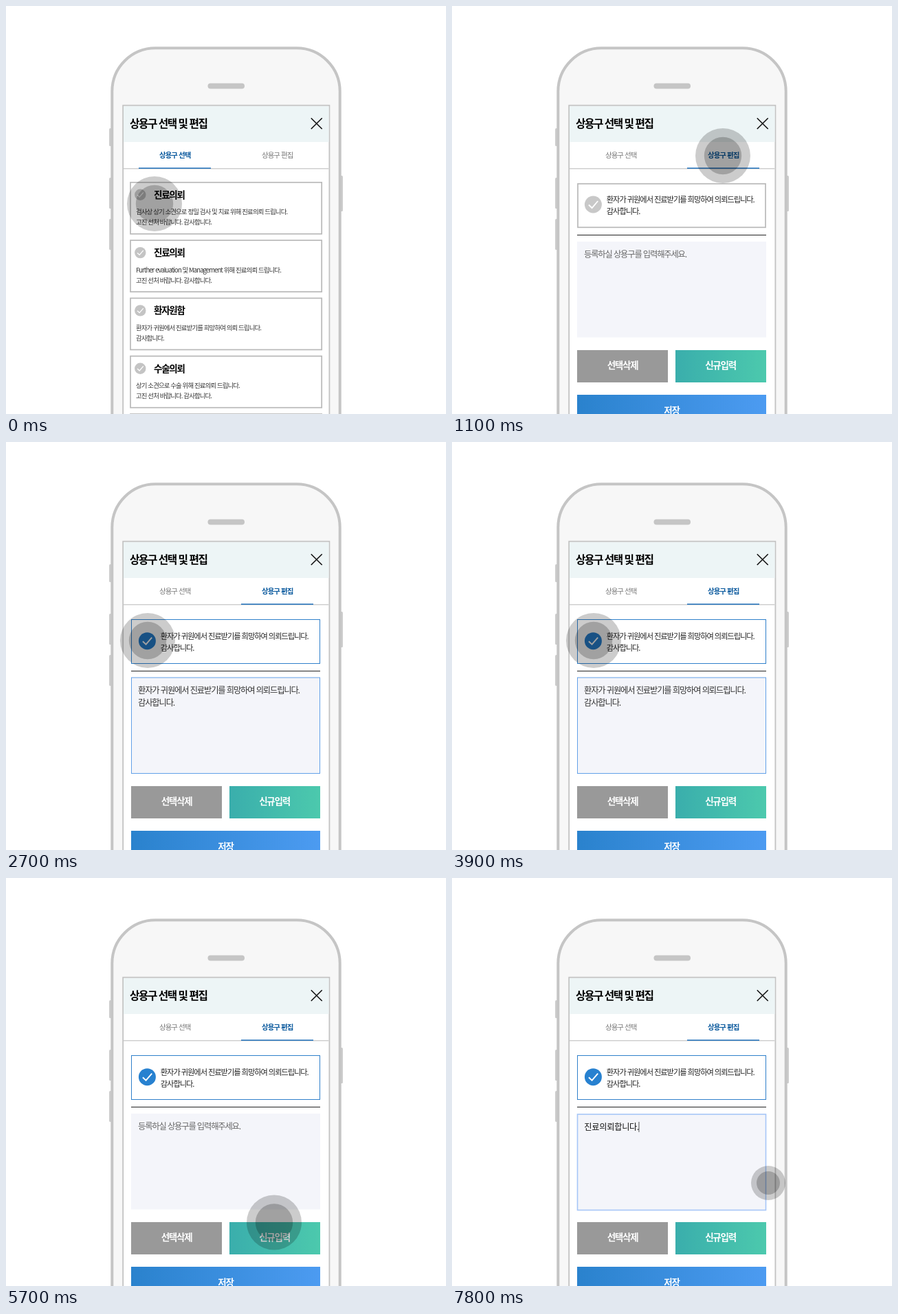
Animation, 640 px wide and 594 px high, one loop 8000 ms. Source, as an HTML page:

```html
<!DOCTYPE html>
<html lang="ko">
<head>
<meta charset="utf-8">
<title>상용구 선택 및 편집</title>
<style>
html, body { margin: 0; width: 100%; height: 100%; overflow: hidden; background: #fff; }
svg { display: block; width: 640px; height: 594px; }
text { font-family: "Noto Sans CJK KR", "Noto Sans CJK", "Noto Sans CJK JP", sans-serif; letter-spacing: -.094em; white-space: pre; }
</style>
</head>
<body>
<svg id="stage" viewBox="0 0 640 594" xmlns="http://www.w3.org/2000/svg">
  <defs>
    <linearGradient id="teal"><stop stop-color="#3aaeac"/><stop offset="1" stop-color="#4cc9ad"/></linearGradient>
    <linearGradient id="blue"><stop stop-color="#2a82cd"/><stop offset="1" stop-color="#4c9bf1"/></linearGradient>
  </defs>
</svg>
<script>
const LOOP = 8000;
const stage = document.getElementById('stage');

function add(parent, tag, attrs) {
  const el = document.createElementNS('http://www.w3.org/2000/svg', tag);
  set(el, attrs);
  return parent.appendChild(el);
}
function set(el, attrs) {
  for (const k in attrs) el.setAttribute(k, attrs[k]);
}
const group = parent => add(parent, 'g', {});
const rect = (p, x, y, width, height, fill, more = {}) =>
  add(p, 'rect', { x, y, width, height, fill, ...more });
const line = (p, x1, y1, x2, y2, stroke, w = 1) =>
  add(p, 'line', { x1, y1, x2, y2, stroke, 'stroke-width': w });

// Places text by the vertical middle of its Hangul glyphs.
function label(p, str, x, mid, size, fill, more = {}) {
  const el = add(p, 'text', { x, y: mid + size * .37, 'font-size': size, fill, ...more });
  el.textContent = str;
  return el;
}
const bold = { 'font-weight': 700 };
const centered = { 'font-weight': 700, 'text-anchor': 'middle' };

function check(p, cx, cy, r, fill) {
  const g = add(p, 'g', { transform: `translate(${cx} ${cy}) scale(${r / 12.5})` });
  const disc = add(g, 'circle', { r: 12.5, fill });
  add(g, 'path', { d: 'M-6.5 .5L-1.8 5L6.8 -5', fill: 'none', stroke: '#fff', 'stroke-width': 1.9 });
  return disc;
}
function show(el, on) {
  el.setAttribute('display', on ? 'inline' : 'none');
}

// Phone
const phone = group(stage);
for (const [x, y, h] of [[150, 178, 26], [150, 250, 45], [150, 310, 45], [485, 247, 52]])
  rect(phone, x, y, 5, h, '#cdcdcd', { rx: 1.5 });
rect(phone, 154.3, 61.3, 331.4, 640, '#f7f7f7', { rx: 63, stroke: '#c5c5c5', 'stroke-width': 4 });
rect(phone, 293.5, 112.5, 53.5, 8, '#c5c5c5', { rx: 4 });
rect(phone, 170.2, 144.7, 300.2, 500, '#fff', { stroke: '#c3c3c3', 'stroke-width': 1.8 });
rect(phone, 171, 146, 298.5, 52, '#edf5f6');
label(phone, '상용구 선택 및 편집', 180, 171.5, 15.7, '#000', bold);
line(phone, 443.8, 163.3, 459.7, 179, '#111', 1.6);
line(phone, 459.7, 163.3, 443.8, 179, '#111', 1.6);
line(phone, 171, 236.8, 469.5, 236.8, '#cfcfcf', 1.4);

// Tabs
const tabs = [['상용구 선택', 223], ['상용구 편집', 372]].map(([name, x]) => ({
  name: label(phone, name, x, 217.5, 10.5, '#777', bold),
  bar: rect(phone, x - 30, 235.4, 105, 1.5, '#1c6db8')
}));

// List of phrases
const list = group(stage);
const cards = [
  ['진료의뢰', '검사상 상기 소견으로 정밀 검사 및 치료 위해 진료의뢰 드립니다.', '고진 선처 바랍니다. 감사합니다.'],
  ['진료의뢰', 'Further evaluation 및 Management 위해 진료의뢰 드립니다.', '고진 선처 바랍니다. 감사합니다.'],
  ['환자원함', '환자가 귀원에서 진료받기를 희망하여 의뢰 드립니다.', '감사합니다.'],
  ['수술의뢰', '상기 소견으로 수술 위해 진료의뢰 드립니다.', '고진 선처 바랍니다. 감사합니다.'],
  ['', '', '']
];
cards.forEach(([head, a, b], i) => {
  const y = 256 + i * 84.3;
  rect(list, 181, y + .8, 278.2, 75, '#fff', { stroke: '#b9b9b9', 'stroke-width': 1.7 });
  if (!head) return;
  check(list, 195.3, y + 18.8, 8.2, '#c4c4c4');
  label(list, head, 215, y + 18.8, 13.5, '#000', bold);
  label(list, a, 189, y + 44, 9.45, '#333');
  label(list, b, 189, y + 59, 9.45, '#333');
});

// Edit form
const form = group(stage);
const phrase = ['환자가 귀원에서 진료받기를 희망하여 의뢰드립니다.', '감사합니다.'];
const item = rect(form, 183, 258.8, 273, 63.5, '#fff');
const itemBody = group(form);
const itemDisc = check(itemBody, 205.4, 289, 12.5, '#c8c8c8');
label(itemBody, phrase[0], 224.8, 282.3, 11.25, '#222');
label(itemBody, phrase[1], 224.8, 299, 11.25, '#222');
line(form, 182, 333.5, 457, 333.5, '#222');
rect(form, 182, 501, 132, 47, '#999');
rect(form, 325, 501, 132, 47, 'url(#teal)');
rect(form, 182, 566, 275, 47, 'url(#blue)');
label(form, '선택삭제', 248, 523, 13.5, '#fff', centered);
label(form, '신규입력', 390.5, 523, 13.5, '#fff', centered);
label(form, '저장', 319.5, 589.5, 13.5, '#fff', centered);

const area = group(stage);
const glow = rect(area, 182, 336, 277, 151, '#fff');
const field = rect(area, 182, 343, 275, 139.5, '#f4f5fa');
const hint = label(area, '등록하실 상용구를 입력해주세요.', 192, 361.5, 12.3, '#666');
const filled = group(area);
label(filled, phrase[0], 192, 361, 12.3, '#333');
label(filled, phrase[1], 192, 379.5, 12.3, '#333');
const typed = label(area, '', 192.3, 362.3, 12.2, '#111', { style: 'letter-spacing:-.02em' });
const caret = line(area, 191, 355, 191, 370, '#555', 1);

// Touch point
const touch = group(stage);
add(touch, 'circle', { r: 40, fill: '#000', 'fill-opacity': .2 });
add(touch, 'circle', { r: 27.2, fill: '#000', 'fill-opacity': .21 });

// Dimmed guide, leaving the text field open
const guide = group(stage);
add(guide, 'path', {
  d: 'M171 145.5H470V594H171ZM182 336V487H459V336Z',
  'fill-rule': 'evenodd', fill: '#000', 'fill-opacity': .6
});
const big = { ...centered, style: 'letter-spacing:0' };
const guideTop = label(guide, '', 316.5, 262, 35, '#fff', big);
const guideLow = label(guide, '', 316.5, 308, 35, '#fff', big);

const clamp = v => Math.max(0, Math.min(1, v));
const stops = [[216, 288], [394, 218], [206, 289], [390, 524], [390, 434]];
const moves = [500, 2200, 4100, 5700];
const word = '진료의뢰합니다.';

function touchAt(t) {
  let [x, y] = stops[0];
  moves.forEach((start, i) => {
    const p = clamp((t - start + 100) / 400);
    x += (stops[i + 1][0] - stops[i][0]) * p;
    y += (stops[i + 1][1] - stops[i][1]) * p;
  });
  // Swings aside and shrinks while the text is typed.
  const q = clamp((t - 7000) / 500);
  return [x + 70 * q, y + 10 * q + 32 * q * (1 - q), 1 - .375 * q];
}

function draw(time) {
  const t = Math.floor(time / 100) * 100;
  const editing = t >= 1000;
  const picked = t >= 2700;
  const copied = picked && t < 4600;
  const focused = t >= 6200;
  const typing = t >= 7000;
  const guideOne = t >= 2900 && t < 3900;
  const guideTwo = t >= 4700 && t < 5700;

  show(list, !editing);
  show(form, editing);
  show(area, editing);
  tabs.forEach((tab, i) => {
    const on = editing === (i === 1);
    set(tab.name, { fill: on ? '#0b5a9e' : '#777', 'font-weight': on ? 700 : 500 });
    show(tab.bar, on);
  });

  set(item, picked
    ? { x: 182.5, y: 258.5, width: 274, height: 64, stroke: '#2f80cb', 'stroke-width': 1 }
    : { x: 183, y: 258.8, width: 273, height: 63.5, stroke: '#b9b9b9', 'stroke-width': 1.7 });
  set(itemDisc, { fill: picked ? '#2781d0' : '#c8c8c8' });
  set(itemBody, { transform: `translate(0 ${picked ? .7 : 0})` });

  show(glow, guideOne || guideTwo);
  if (focused) set(field, { x: 182.5, y: 344, width: 274, height: 139.5, stroke: '#a6c6f7', 'stroke-width': 1.6 });
  else if (copied) set(field, { x: 182.5, y: 343, width: 274, height: 139.5, stroke: '#62a0e8', 'stroke-width': 1 });
  else set(field, { x: 182, y: 343, width: 275, height: 139.5, stroke: 'none' });
  show(filled, copied);
  show(hint, !copied && !typing);
  set(hint, { fill: focused ? '#8a8a8a' : '#666', 'font-weight': focused ? 500 : 400 });

  typed.textContent = typing ? word.slice(0, (t - 7000) / 100) : '';
  const end = typed.textContent ? 192 + typed.getComputedTextLength() : 191;
  set(caret, { x1: end, x2: end });
  show(caret, typing || (t >= 6400 && t < 6600) || t >= 6800);

  const [x, y, s] = touchAt(t);
  set(touch, { transform: `translate(${x} ${y}) scale(${s})` });

  show(guide, guideOne || guideTwo);
  guideTop.textContent = guideOne ? '이곳에서 상용구' : '이곳에 상용구';
  guideLow.textContent = guideOne ? '편집 가능' : '신규입력 가능';
}

const begin = performance.now();
function tick() {
  draw((performance.now() - begin) % LOOP);
  requestAnimationFrame(tick);
}
tick();
</script>
</body>
</html>
```
